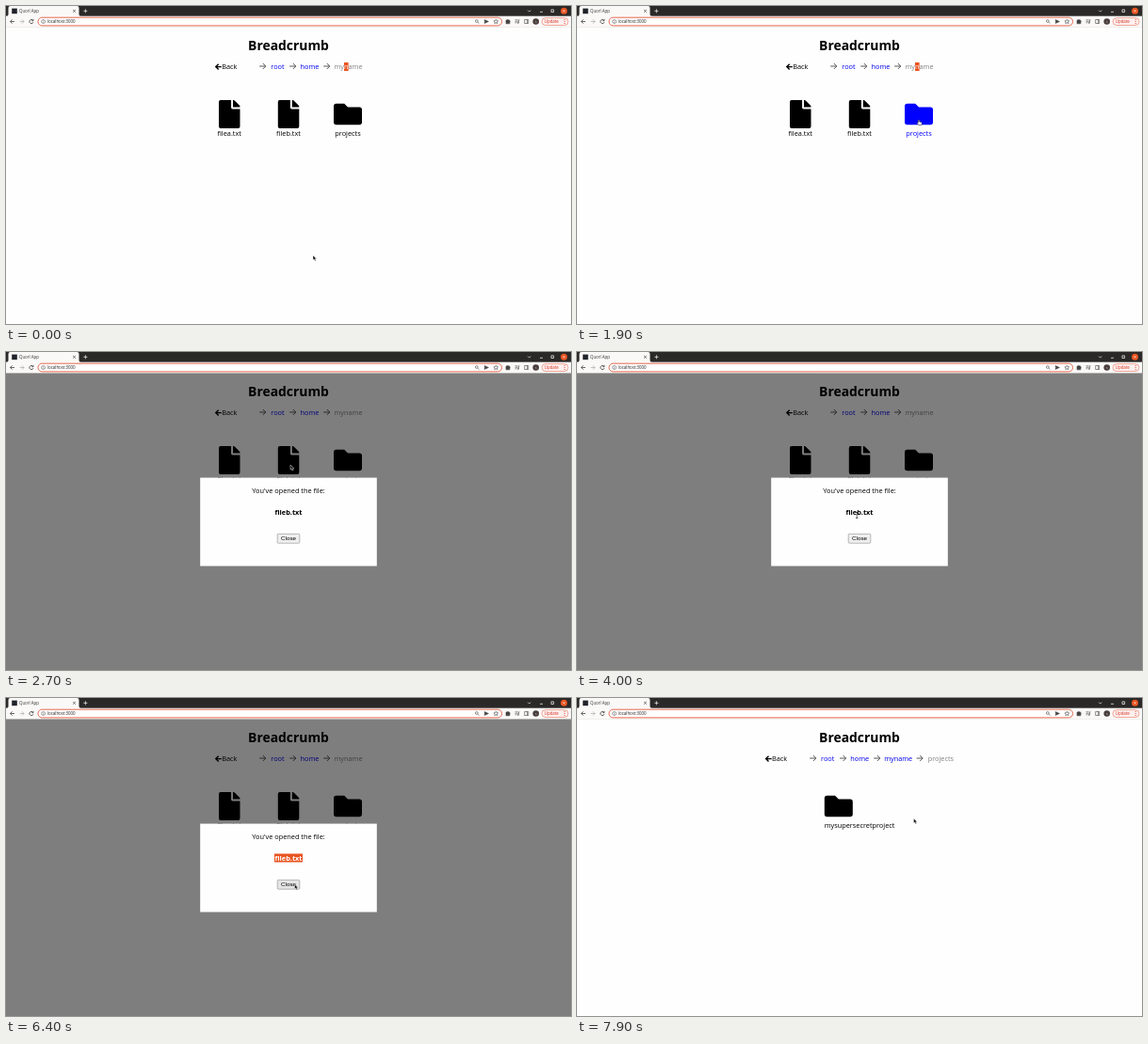
An HTML page for the animation above (8000 ms loop, 600x338 px).

```html
<!DOCTYPE html>
<html lang="en">
<head>
<meta charset="utf-8">
<title>Breadcrumb</title>
<style>
html, body { margin: 0; width: 100%; height: 100%; overflow: hidden; background: #fefefe; }
svg { display: block; width: 100%; height: 100%; }
text { font: 7.35px "Open Sans", "Noto Sans", sans-serif; }
.mid { text-anchor: middle; }
.bold { font-weight: 700; }
.title { font-size: 13.9px; }
.small { font-size: 4.4px; }
.link { fill: #00e; }
.here { fill: #808080; }
.line { fill: none; stroke: #444; stroke-width: .8; }
.hover { fill: #00f; }
.button { font: 6.25px "Liberation Sans", Arial, sans-serif; }
</style>
</head>
<body>
<svg viewBox="0 0 600 338">
  <defs>
    <path id="file" d="M1.9 0H13.1V8Q13.1 9.4 14.5 9.4H22.5V28.1a1.9 1.9 0 0 1-1.9 1.9H1.9A1.9 1.9 0 0 1 0 28.1V1.9A1.9 1.9 0 0 1 1.9 0ZM15 0h.5q.7 0 1.3.6L22 5.7q.5.5.5 1.3v.5H15Z"/>
    <path id="folder" d="M2.8 0H11.2L15 3.75H27.2a2.8 2.8 0 0 1 2.8 2.8V19.7a2.8 2.8 0 0 1-2.8 2.8H2.8A2.8 2.8 0 0 1 0 19.7V2.8A2.8 2.8 0 0 1 2.8 0Z"/>
    <path id="next" d="M0 0H6.6M3.6-3l3 3-3 3" fill="none" stroke="#505050" stroke-width=".95"/>
    <path id="back" d="M6.8 0H.9M3.7-2.9L.8 0l2.9 2.9" fill="none" stroke="#000" stroke-width="1.4"/>
    <clipPath id="picked"><rect id="pickedArea" y="165.6" height="9"/></clipPath>
  </defs>

  <rect width="600" height="338" fill="#fefefe"/>

  <!-- browser frame -->
  <rect width="600" height="11" fill="#2b2927"/>
  <path d="M0 11Q2.5 11 2.5 8.5V2Q2.5 0 4.5 0H75.5Q77.5 0 77.5 2V8.5Q77.5 11 80 11Z" fill="#faf9f8"/>
  <rect y="10.7" width="600" height="11.8" fill="#faf9f8"/>
  <rect y="22.2" width="600" height=".4" fill="#dedbd8"/>
  <rect x="6.2" y="2.6" width="5.6" height="5.6" fill="#20232a"/>
  <text class="small" x="14" y="7" fill="#333">Quorl App</text>
  <path class="line" d="M71.2 4l2.6 2.6M73.8 4l-2.6 2.6"/>
  <path class="line" d="M82.4 5.3h4M84.4 3.3v4M554.2 4.6l1.5 1.5 1.5-1.5M567 6.3h3M579 3.9h2.6v2.6H579Z" style="stroke:#e8e6e4"/>
  <circle cx="592.5" cy="5.3" r="3.5" fill="#e95420"/>
  <path class="line" d="M591.4 4.2l2.2 2.2M593.6 4.2l-2.2 2.2" style="stroke:#fff;stroke-width:.6"/>
  <path class="line" d="M9 16.5H4.6M6.6 14.4L4.5 16.5l2.1 2.1"/>
  <path class="line" d="M14.6 16.5H19M17 14.4l2.1 2.1-2.1 2.1" style="stroke:#b5b3b1"/>
  <path class="line" d="M28.6 15.2a2.1 2.1 0 1 0 .4 1.9M29 13.9v1.8h-1.8"/>
  <rect x="34" y="12.2" width="492.5" height="8.7" rx="4.35" fill="#fff" stroke="#e4573d" stroke-width=".9"/>
  <circle class="line" cx="39.6" cy="16.5" r="2" style="stroke-width:.5"/>
  <path class="line" d="M39.6 16.2v1.5M39.6 15.2v.5" style="stroke-width:.5"/>
  <text class="small" x="44" y="18.1" fill="#222">localhost:3000</text>
  <g class="line" style="stroke-width:.6">
    <circle cx="499.8" cy="16" r="1.4"/>
    <path d="M500.9 17.1l1.6 1.6"/>
    <path d="M508 14.6l4.4 1.9-4.4 1.9.5-1.9Z" fill="#444"/>
    <path d="M520.3 14.2l.7 1.5 1.7.2-1.3 1.1.4 1.7-1.5-.9-1.5.9.4-1.7-1.3-1.1 1.7-.2Z"/>
    <path d="M531 15h1.3q.6-1.5 1.2 0h1.3v1.2q1.4.6 0 1.2v1.4H531Z" fill="#444"/>
    <path d="M540.5 14.8h3.2M540.5 16.3h3.2M540.5 17.8h1.7M545.5 14.8h-1v3"/>
    <circle cx="543.8" cy="17.9" r=".6"/>
    <path d="M550.7 14.5h4v4h-4ZM553.5 14.5v4"/>
  </g>
  <circle cx="562.7" cy="16.5" r="3.3" fill="#4a3f3d"/>
  <text class="small mid" x="562.7" y="17.7" fill="#ddd" style="font-size:3.4px">s</text>
  <rect x="569" y="12.6" width="28" height="7.9" rx="3.95" fill="#fdf0ee" stroke="#e4573d" stroke-width=".5"/>
  <text class="small" x="571.8" y="18" fill="#d93025">Update</text>
  <path d="M593.2 14.4v.1M593.2 16.4v.1M593.2 18.4v.1" stroke="#d93025" stroke-width=".9" stroke-linecap="round"/>

  <!-- page -->
  <text class="mid bold title" x="300" y="46.6">Breadcrumb</text>
  <g id="home">
    <g id="homeTrail"></g>
    <g id="letter">
      <rect x="359" y="60" width="4.6" height="9" fill="#e95420"/>
      <text class="mid" x="361.3" y="67" fill="#fff">n</text>
    </g>
    <g>
      <use href="#file" x="226" y="100"/>
      <text class="mid" x="237.2" y="138.3">filea.txt</text>
    </g>
    <g id="fileB">
      <use href="#file" x="288.8" y="100"/>
      <text class="mid" x="300" y="138.3">fileb.txt</text>
    </g>
    <g id="projects">
      <use href="#folder" x="348" y="103.8"/>
      <text class="mid" x="363" y="138.3">projects</text>
    </g>
  </g>
  <g id="inside">
    <g id="insideTrail"></g>
    <use href="#folder" x="262.8" y="103.8"/>
    <text class="mid" x="300" y="138.3">mysupersecretproject</text>
  </g>

  <g id="modal">
    <rect y="22.5" width="600" height="315.5" fill="#000" opacity=".5"/>
    <rect x="206.2" y="133.6" width="187.6" height="93.9" fill="#fefefe"/>
    <text class="mid" x="300" y="149.7">You've opened the file:</text>
    <text class="mid bold" x="300" y="172.7">fileb.txt</text>
    <g clip-path="url(#picked)">
      <rect x="285" y="165" width="30" height="10" fill="#e95420"/>
      <text class="mid bold" x="300" y="172.7" fill="#fff">fileb.txt</text>
    </g>
    <rect id="button" x="288.2" y="193.4" width="23.6" height="9.8" rx="1" fill="#efefef" stroke="#767676" stroke-width=".5"/>
    <text class="mid button" x="300" y="200.4">Close</text>
  </g>

  <g id="cursor">
    <path id="arrow" d="M0 0V5.1L1.2 4.1 2.1 6 3.1 5.5 2.2 3.7H3.8Z" fill="#111" stroke="#fff" stroke-width=".45"/>
    <path id="hand" d="M-.6.3Q0-.5.6.3V2.1L2.8 2.6Q3.5 2.9 3.3 3.6L2.8 5.6H-.2L-2 3.3Q-1.7 2.5-.6 3.2Z" fill="#fff" stroke="#111" stroke-width=".45"/>
    <path id="beam" d="M-1.2-3H1.2M0-3V3M-1.2 3H1.2" fill="none" stroke="#222" stroke-width=".7"/>
  </g>
</svg>
<script>
const $ = id => document.getElementById(id);
const show = (id, on) => $(id).style.display = on ? '' : 'none';

// Back link, then a separator and a name for each crumb centre; the last crumb is the current place
function trail(id, backX, crumbs) {
  let html = `<use href="#back" x="${backX}" y="64.6"/><text x="${backX + 7.2}" y="67.3">Back</text>`;
  crumbs.forEach(([name, arrowX, x], i) => {
    const kind = i < crumbs.length - 1 ? 'link' : 'here';
    html += `<use href="#next" x="${arrowX}" y="64"/><text class="mid ${kind}" x="${x}" y="67">${name}</text>`;
  });
  $(id).innerHTML = html;
}
trail('homeTrail', 222, [['root', 269.2, 288.5], ['home', 301.2, 322.5], ['myname', 337.2, 363.5]]);
trail('insideTrail', 199.8, [['root', 247.2, 266.2], ['home', 279, 300.2], ['myname', 315.2, 341.2], ['projects', 360.6, 386.4]]);

// Pointer moves: start ms, end ms, x, y
const moves = [
  [0, 0, 326, 265], [100, 700, 303, 122], [1500, 1900, 363, 121], [2000, 2400, 302, 120],
  [3000, 3600, 295.5, 170], [3900, 4100, 299, 177], [4600, 5100, 316, 169], [5100, 5300, 280.5, 172],
  [5500, 5900, 306.5, 198], [6600, 6900, 302, 122], [6900, 7200, 330, 66], [7200, 7500, 362, 118],
  [7800, 7900, 357.5, 128]
];

function pointer(t) {
  let x = 326, y = 265;
  for (const [start, end, toX, toY] of moves) {
    if (t < start) break;
    const p = end > start ? Math.min(1, (t - start) / (end - start)) : 1;
    const k = p * p * (3 - 2 * p);
    x += (toX - x) * k;
    y += (toY - y) * k;
  }
  return [x, y];
}

function draw(now) {
  const t = Math.floor(now % 8000 / 100) * 100;
  const [x, y] = pointer(t);
  const within = (x0, y0, x1, y1) => x >= x0 && x <= x1 && y >= y0 && y <= y1;
  const modal = t >= 2700 && t < 6500;
  const inside = t >= 7700;
  const active = !modal && !inside;
  const onFile = active && within(286, 100, 313, 141);
  const onFolder = active && within(348, 100, 378, 141);
  const onText = modal && within(285, 165, 315, 175);

  show('home', !inside);
  show('inside', inside);
  show('modal', modal);
  show('letter', t < 2600);
  $('fileB').setAttribute('class', onFile ? 'hover' : '');
  $('projects').setAttribute('class', onFolder ? 'hover' : '');
  $('button').setAttribute('fill', modal && within(288, 193, 312, 203) ? '#e5e5e5' : '#efefef');

  const from = t <= 5100 ? 315 : t < 5300 ? Math.max(285, Math.min(315, x)) : 285;
  $('pickedArea').setAttribute('x', from);
  $('pickedArea').setAttribute('width', 315 - from);

  $('cursor').setAttribute('transform', `translate(${x} ${y})`);
  show('hand', onFile || onFolder);
  show('beam', onText);
  show('arrow', !onFile && !onFolder && !onText);
}

const begin = performance.now();
function tick() {
  draw(performance.now() - begin);
  requestAnimationFrame(tick);
}
tick();
</script>
</body>
</html>
```
